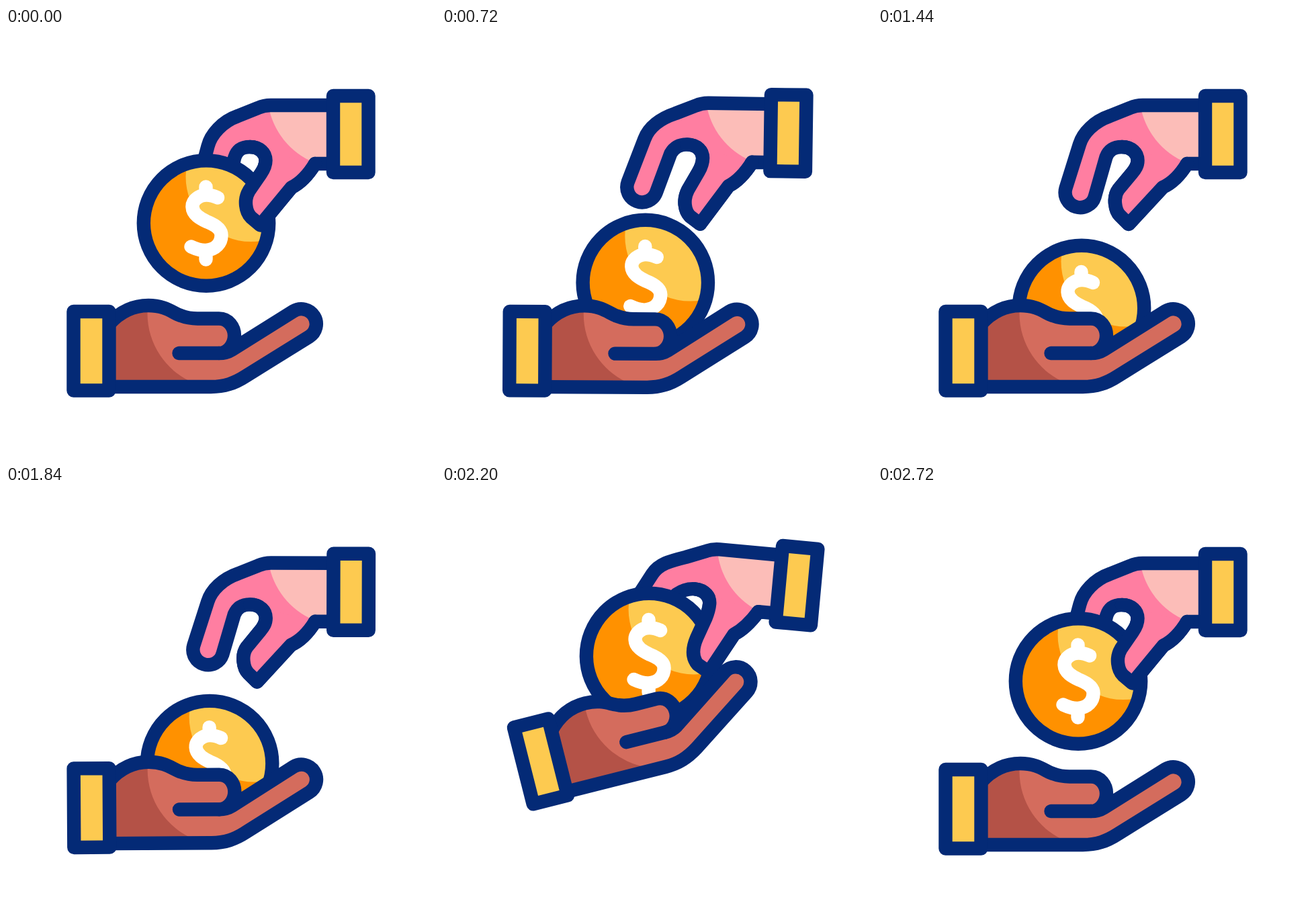
Write an HTML page that moves like this. It is 640 px wide and 640 px high and loops after 3 s.

```html
<!DOCTYPE html>
<html lang="en">
<head>
<meta charset="utf-8">
<title>Giving hands</title>
<style>
  html, body { margin: 0; width: 100%; height: 100%; overflow: hidden; background: #fff; }
  svg { display: block; width: 100vw; height: 100vh; }
  .line { fill: none; stroke: #042a76; stroke-width: 20.4; stroke-linecap: round; stroke-linejoin: round; }
  .cuff, .shine { fill: #fdca50; }
  .skin { fill: #ff7ea1; }
  .tan { fill: #d46c5d; }
  .sign { stroke: #fff; }
</style>
</head>
<body>
<svg viewBox="0 0 640 640">
  <clipPath id="disc"><circle r="93"/></clipPath>

  <g class="upper">
    <path class="palm skin"/>
    <path fill="#fcbdb8" d="M390.5 115A112 112 0 0 0 458 200L487 202V115Z"/>
    <path class="palm line"/>
    <rect class="line cuff" x="487" y="101" width="52.5" height="114"/>
  </g>

  <g id="coin">
    <circle r="93" fill="#ff9100"/>
    <circle class="shine" cx="66.5" cy="-69.5" r="97" clip-path="url(#disc)"/>
    <path class="line sign" d="M17 -38C8 -42 -1 -43 -8 -40.5C-16 -37 -21 -31 -20.5 -24C-20 -13 -9 -7 .5 -2.5C12 2 22.5 8 22.5 18C22.5 30 14 39 0 40.5C-8 41 -16 38 -22.5 35M-.5 -54V-44M-.5 54V42"/>
    <circle class="line" r="93.2"/>
  </g>

  <g class="upper"><path id="thumb" class="line skin"/></g>

  <g id="lower">
    <path class="open tan"/>
    <path fill="#b45247" d="M210.5 413V425A112 112 0 0 0 280 528.6V534H154V440C172 420 192 413 210.5 413Z"/>
    <path class="open line"/>
    <path class="line" d="M257.5 484H317"/>
    <rect class="line cuff" x="100.5" y="422" width="53" height="117.5"/>
  </g>
</svg>
<script>
const LOOP = 3000, STEP = 40, RAD = Math.PI / 180;
const all = (sel, attr, value) =>
  document.querySelectorAll(sel).forEach(el => el.setAttribute(attr, value));
const pt = (x, y) => `${x.toFixed(2)} ${y.toFixed(2)} `;

// Smooth 0 to 1 between two times.
function ramp(t, from, to) {
  const p = Math.min(1, Math.max(0, (t - from) / (to - from)));
  return p * p * (3 - 2 * p);
}

// Index finger, from the cuff to the top of the arch; s opens it.
function indexPath(s) {
  const a = (16.6 + 7.4 * s) * RAD, sin = Math.sin(a), cos = Math.cos(a), r = 22.5;
  const tipX = 301 - 10 * s, tipY = 245 - 8 * s;
  const x = 300 - 1.5 * s, y = 173 - 8 * s;
  return 'M487 115H394Q384 115 375 119L345 131'
    + `C${pt(322, 139)}${pt(x + 18 * sin, y - 18 * cos)}${pt(x, y)}`
    + `L${pt(tipX - r * cos, tipY - r * sin)}A${r} ${r} 0 0 0 ${pt(tipX + r * cos, tipY + r * sin)}`
    + `L${pt(339.5 - 2 * s, 192 - 3 * s)}C344 181 352 177 363 177`;
}

// Thumb, from the top of the arch to the wrist; s opens it.
function thumbPath(s) {
  const m = (x, y, dx, dy) => pt(x + dx * s, y + dy * s);
  return `C378 177 386.5 187 386.5 197C386.5 205 ${m(383, 210, 1, 2)}${m(378, 216, 3, 2)}`
    + `L${m(358, 240, 9, 6)}C${m(349, 252, 11, 10)}${m(353, 272, 10, 5)}${m(360, 279, 11, 6)}`
    + `L${m(373, 292, 14, 4)}L${m(424, 237, 2, 1)}Q444 228 460 202`;
}

// Open hand; its long finger bends up around the knuckle.
function openPath(deg) {
  const c = Math.cos(deg * RAD), n = Math.sin(deg * RAD);
  const bent = (x, y) => pt(342 + (x - 342) * c + (y - 500) * n, 500 - (x - 342) * n + (y - 500) * c);
  return 'M154 440C172 420 192 413 212 413C238 413 248 424 260 428Q272 432.5 285 432.5H317'
    + 'C331 432.5 340 445 340 458C340 470 331 484 317 484Q328 484 336 479'
    + `L${bent(427.8, 421.5)}A22.3 22.3 0 0 1 ${bent(451.2, 459.5)}`
    + 'L357 518C340 529 325 534 305 534H154';
}

function draw(now) {
  const t = Math.floor((now % LOOP + 1) / STEP) * STEP;

  const lift = ramp(t, 200, 480), drop = ramp(t, 480, 880);
  const back = ramp(t, 2240, 2690);
  const up = lift - drop;                                  // first pull upwards
  const fall = drop - ramp(t, 880, 1440);                  // coin sinks, then settles
  const dip = ramp(t, 690, 880) - ramp(t, 880, 1440);      // lower hand gives way
  const spread = drop - ramp(t, 880, 1320);                // fingers let go, then relax
  const hoist = ramp(t, 1800, 2240) - back;                // coin is handed back up
  const held = 1 - drop + back;

  const reach = 1.2 * spread + 1.6 * hoist;
  const thumb = thumbPath(reach + .4 * (1 - lift + back));
  all('.palm', 'd', indexPath(reach - .35 * held - .65 * up) + thumb + 'H487');
  all('#thumb', 'd', 'M363 177' + thumb);
  all('.open', 'd', openPath(7.4 * dip + 2.1 * hoist));

  all('.upper', 'transform', `rotate(${2.25 * up + 5.4 * hoist} 627 313)`);
  all('#coin', 'transform', `translate(${303 - 5 * held + 4.4 * up + 5.2 * hoist} `
    + `${417 - 126.5 * held - 9 * up + 15 * fall - 168 * hoist})`);
  all('#lower', 'transform', `translate(${20.4 * hoist} ${-72.5 * hoist}) `
    + `rotate(${4 * dip - 14.5 * hoist} 127 480.5)`);
}

function tick() {
  draw(performance.now());
  requestAnimationFrame(tick);
}
tick();
</script>
</body>
</html>
```
